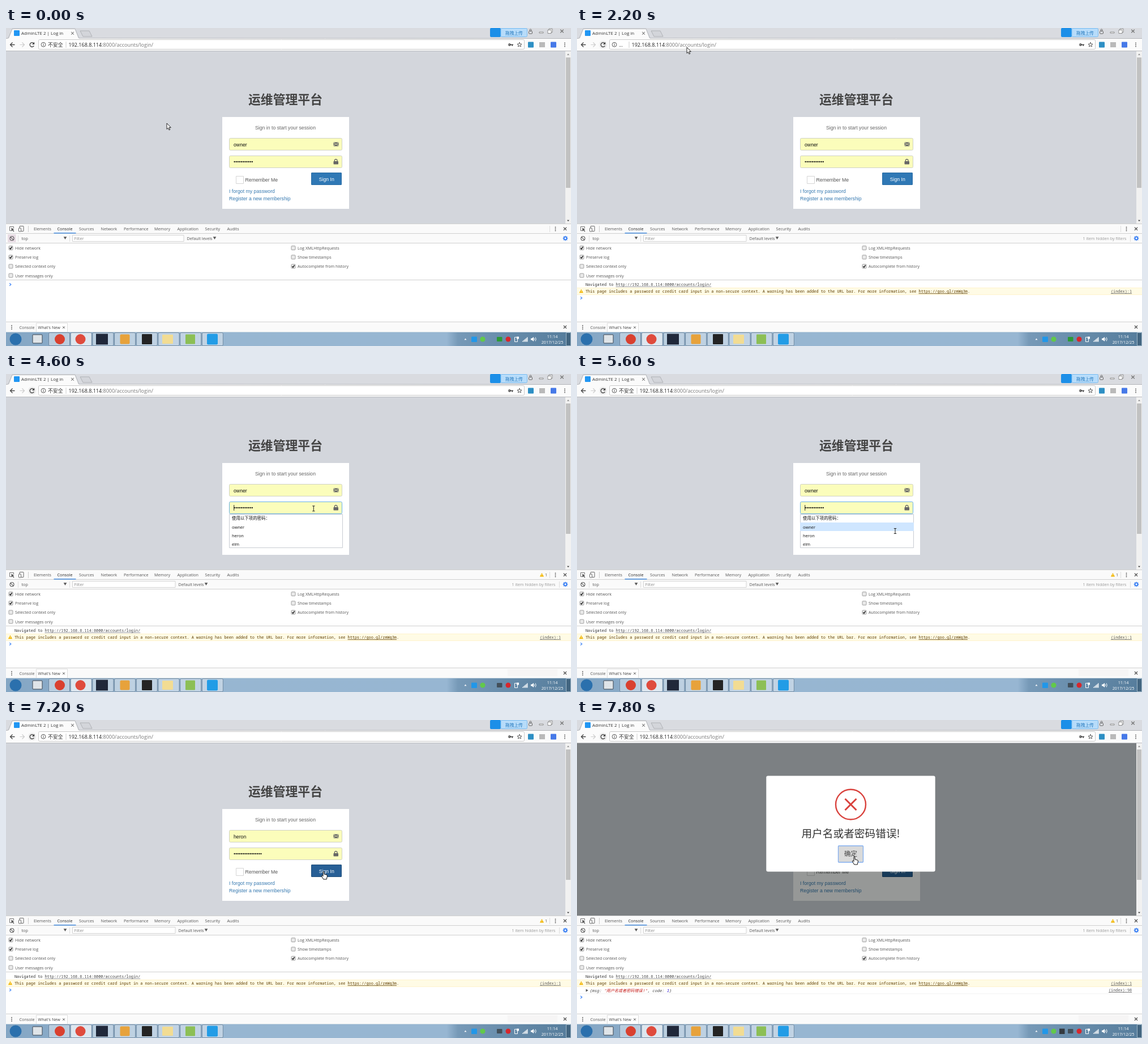
Write an HTML page with a canvas that moves like this. It is 998x561 px and loops after 8000 ms.

```html
<!DOCTYPE html>
<html lang="zh-CN">
<head>
<meta charset="utf-8">
<style>
html, body { margin: 0; width: 100%; height: 100%; overflow: hidden; background: #fff; }
canvas { display: block; }
</style>
</head>
<body>
<canvas id="stage" width="998" height="561"></canvas>
<script>
const c = document.getElementById('stage').getContext('2d');
const UI = '"Open Sans", "Noto Sans CJK SC", sans-serif';
const PAGE = '"Liberation Sans", Arial, sans-serif';
const CJK = '"Noto Sans CJK SC", "Noto Sans CJK", sans-serif';
const MONO = '"Noto Sans Mono", "Noto Sans CJK SC", monospace';
const LOOP = 8000, STEP = 200;
const URL_HOST = '192.168.8.114', URL_PATH = ':8000/accounts/login/';

function rect(x, y, w, h, fill, stroke, radius = 0, width = 1) {
  c.beginPath();
  c.roundRect(x, y, w, h, radius);
  if (fill) { c.fillStyle = fill; c.fill(); }
  if (stroke) { c.strokeStyle = stroke; c.lineWidth = width; c.stroke(); }
}
function dot(x, y, r, fill) {
  c.beginPath();
  c.arc(x, y, r, 0, 7);
  c.fillStyle = fill;
  c.fill();
}
function arc(x, y, r, color, width = 1, from = 0, to = 7) {
  c.beginPath();
  c.arc(x, y, r, from, to);
  c.strokeStyle = color;
  c.lineWidth = width;
  c.stroke();
}
function line(points, color, width = 1) {
  c.beginPath();
  points.forEach(([x, y]) => c.lineTo(x, y));
  c.strokeStyle = color;
  c.lineWidth = width;
  c.stroke();
}
function path(d, x, y, fill, stroke, width = 1) {
  c.save();
  c.translate(x, y);
  const p = new Path2D(d);
  if (fill) { c.fillStyle = fill; c.fill(p); }
  if (stroke) { c.strokeStyle = stroke; c.lineWidth = width; c.stroke(p); }
  c.restore();
}
// y is the middle of the capitals; returns the right end of the text
function text(s, x, y, size, color, family = UI, align = 'left', style = '') {
  c.font = `${style} ${size}px ${family}`;
  c.textAlign = align;
  c.fillStyle = color;
  c.fillText(s, x, y + size * 0.36);
  return x + c.measureText(s).width;
}
function link(s, x, y, color) {
  const end = text(s, x, y, 6.87, color, MONO);
  rect(x, y + 3.6, end - x, 0.7, color);
  return end;
}
const cross = (x, y, r, color, w = 1) => {
  line([[x - r, y - r], [x + r, y + r]], color, w);
  line([[x + r, y - r], [x - r, y + r]], color, w);
};
const menuDots = (x, y, color = '#555') => [-3, 0, 3].forEach(d => dot(x, y + d, 0.9, color));
const down = (x, y, color) => path('M-2.8-2.3H2.8L0 2.6Z', x, y, color);
const warning = (x, y) => {
  path('M0-3.5L3.6 3H-3.6Z', x, y, '#f2b600');
  rect(x - 0.4, y - 1.3, 0.8, 2.4, '#fff');
};

function drawBrowser(t) {
  rect(0, 0, 998, 18, '#d9dbe0');
  rect(0, 18, 998, 23, '#fbfbfb');
  rect(0, 40, 998, 1, '#b9bbbf');
  line([[0, 18.5], [4, 18], [11, 1.5], [122, 1.5], [129, 18], [998, 18.5]], '#b4b6ba');
  path('M5 19L11.5 2H121.5L128 19Z', 0, 0, '#fbfbfb');
  rect(14, 4, 10, 10, '#2196f3', null, 1);
  text('AdminLTE 2 | Log in', 27, 9.3, 7.95, '#333');
  cross(117.5, 9.3, 2.3, '#444');
  path('M131 5H147L152 15H136Z', 0, 0, '#d3d5da', '#a5a7ab', 0.8);
  rect(855, 0, 19, 16, '#1c8fe8', null, 2);
  rect(874, 0.5, 46.5, 15, '#b7dcfa', '#7dbdf0', 2);
  text('拖拽上传', 897.5, 9, 7.7, '#2378bd', CJK, 'center');
  arc(926.5, 3.7, 1.6, '#666');
  rect(923.5, 5.5, 6, 4.5, null, '#666', 1);
  rect(942, 7, 7, 2, '#fff', '#777', 0, 0.8);
  rect(959, 1.5, 6, 6, '#fff', '#777', 0, 0.8);
  rect(957, 3.5, 6, 6, '#fff', '#777', 0, 0.8);
  cross(982, 5.5, 2.8, '#777', 1.3);

  path('M4 0H-4M0-4L-4 0L0 4', 11.5, 29.5, null, '#444', 1.3);
  path('M-4 0H4M0-4L4 0L0 4', 28.5, 29.5, null, '#ccc', 1.2);
  if (t >= 1400) dot(46, 29.5, 7, '#ececec');
  arc(46, 29.5, 3.8, '#444', 1.3, 0.5, 5.6);
  path('M0 0V-4.2L-4.2 0Z', 50.2, 29, '#444');
  rect(57.5, 20.5, 858, 17, '#fff', '#c9c9c9', 2);
  arc(66, 29.3, 3.9, '#444', 0.9);
  rect(65.5, 28.5, 1, 3, '#444');
  rect(65.5, 26.7, 1, 1, '#444');

  const chip = t >= 1800 && t < 2200 ? '' : t === 2200 ? '...' : '不安全';
  const urlX = chip === '' ? 77 : chip === '...' ? 96.5 : 110.5;
  if (chip) {
    text(chip, 74, 29.3, 8.9, '#333', chip === '...' ? UI : CJK);
    line([[urlX - 4.5, 24], [urlX - 4.5, 35]], '#ccc');
  }
  const pathX = text(URL_HOST, urlX, 29.3, 9, '#222');
  text(URL_PATH, pathX, 29.3, 9, '#777');

  dot(889.3, 29.5, 2.3, '#444');
  dot(888.8, 29.5, 0.8, '#fff');
  rect(891, 28.7, 5, 1.5, '#444');
  rect(893.5, 29, 1.5, 2.7, '#444');
  path('M0-4L1.2-1.3 4-1 1.8.8 2.5 3.6 0 2.1-2.5 3.6-1.8.8-4-1-1.2-1.3Z', 907, 29.3, null, '#444', 0.9);
  rect(922, 24.5, 10, 10, '#2d8fc4', null, 1);
  rect(942, 25, 10, 9, '#b9b9b9');
  rect(962, 24.5, 10, 10, '#4679e8', null, 1);
  menuDots(987, 29.5);
}

function field(y, focused) {
  rect(394.5, y, 199, 21, '#fbfdbb', focused ? '#66afe9' : '#d0d2c4', 2);
}
function drawPage(t) {
  rect(0, 41, 988, 304, '#d3d6dc');
  text('运维管理平台', 493.5, 126, 21.85, '#444', CJK, 'center', 'bold');
  rect(382, 157, 224, 162, '#fff');
  text('Sign in to start your session', 493.5, 176, 8.72, '#666', PAGE, 'center');

  const second = t >= 5800, focused = t >= 4400 && t < 7000;
  field(194.5, false);
  text(second ? 'heron' : 'owner', 402, 205.4, 8.72, '#111', PAGE);
  rect(578.5, 201.5, 9, 7, '#666');
  path('M0 0L4.5 4L9 0M0 7L3.3 3M9 7L5.7 3', 578.5, 201.5, null, '#fbfdbb', 0.9);
  field(225.5, focused);
  for (let i = 0; i < (second ? 16 : 11); i++) dot(403.6 + i * 3.12, 236, 1.15, '#111');
  if (focused) rect(402.3, 231, 0.9, 10, '#111');
  rect(578.5, 235, 8.5, 5.5, '#666', null, 0.8);
  path('M-2.3 0V-2Q0-5 2.3-2V0', 582.7, 235, null, '#666', 1.3);

  rect(406.5, 261.5, 13, 13, '#fff', '#d5d5d5');
  text('Remember Me', 422.5, 268.3, 8.72, '#555', PAGE);
  const hover = t >= 6400;
  rect(539.5, 255.5, 53, 21, hover ? '#275f96' : '#2f78b5', hover ? '#22507d' : '#2b6da5', 0.5);
  text('Sign In', 566.3, 266.5, 8.72, '#fff', PAGE, 'center');
  text('I forgot my password', 394, 288.1, 8.72, '#3679b0', PAGE);
  text('Register a new membership', 394, 300.5, 8.72, '#3679b0', PAGE);

  if (t >= 4600 && t < 6200) {
    rect(394.5, 247.5, 200, 59, '#fff', '#c8ccd2');
    if (t >= 5200) rect(394, 262 + (second ? 15 : 0), 201, 15, '#cfe6ff');
    text('使用以下项的密码：', 399, 254.7, 7.45, '#111', CJK);
    ['owner', 'heron', 'elm'].forEach((name, i) => text(name, 399, 270 + i * 15, 7.5, '#111'));
  }
}

function drawScrollbar() {
  rect(988, 41, 10, 304, '#f1f1f1');
  rect(989, 52, 8, 230, '#c1c1c1');
  path('M-2 1.3L0-1.3L2 1.3Z', 993, 46.5, '#888');
  path('M-2-1.3L0 1.3L2-1.3Z', 993, 340, '#444');
}

function drawModal(t) {
  const p = Math.min(1, (t - 7400) / 400);
  c.save();
  c.beginPath();
  c.rect(0, 41, 988, 304);
  c.clip();
  rect(0, 41, 988, 304, `rgba(0,6,4,${0.295 + 0.115 * Math.min(1, p * 1.5)})`);
  const scale = 1 + 0.007 * (1 - p);
  c.translate(483.5, 183);
  c.scale(scale, scale);
  c.translate(-483.5, -183);
  rect(334.3, 98.5, 298.4, 169, '#fff', null, 3);
  c.globalAlpha = 0.25 + 0.75 * p;
  c.beginPath();
  c.ellipse(483.5, 149, 26.5, 26.5 * Math.cos((1 - p) * 1.4), 0, 0, 7);
  c.strokeStyle = '#d9423d';
  c.lineWidth = 0.6 + 1.8 * p;
  c.stroke();
  if (p > 0) {
    c.globalAlpha = p;
    cross(483.5, 149, 10 * p, '#d9423d', 3);
  }
  c.globalAlpha = 1;
  text('用户名或者密码错误!', 483.5, 199.8, 18.7, '#333', CJK, 'center');
  rect(461.5, 222, 44, 29, '#dadada', '#82aef0', 1, 1.3);
  text('确定', 483.5, 236.2, 11.5, '#444', CJK, 'center');
  c.restore();
}

function checkbox(x, y, label, on) {
  rect(x, y - 3.5, 7, 7, '#e9e9e9', '#a0a0a0', 1);
  if (on) line([[x + 1.4, y], [x + 2.9, y + 1.9], [x + 5.6, y - 2.1]], '#222', 1.5);
  text(label, x + 11, y + 0.4, 7.2, '#555');
}
function drawDevtools(t) {
  const logged = t >= 1800, failed = t >= 7400;
  rect(0, 345, 998, 191, '#fff');
  rect(0, 345, 998, 34, '#fafafa');
  [345, 362, 379, 444, 518].forEach(y => rect(0, y, 998, 1, '#d0d0d0'));

  path('M4 7H0V0H7V3', 6.5, 350.5, null, '#666', 0.9);
  path('M0 0V6L1.6 4.5L4 7L5 6L2.7 3.6L5 3Z', 9.5, 352.5, '#555');
  rect(24, 349.5, 7, 9, null, '#666', 0.5);
  rect(22.5, 353, 4, 6, '#fff', '#666', 0.5);
  line([[39.5, 349], [39.5, 360]], '#ccc');
  [['Elements', 49], ['Console', 90.5], ['Sources', 129], ['Network', 167.5], ['Performance', 208],
   ['Memory', 262], ['Application', 302.5], ['Security', 351.5], ['Audits', 390.5]]
    .forEach(([label, x]) => text(label, x, 354.7, 7.2, label === 'Console' ? '#222' : '#555'));
  rect(84.5, 361, 39, 1.4, '#4a90e2');
  if (t >= 2400) {
    warning(946.5, 354.5);
    text('1', 952, 354.7, 7.2, '#555');
  }
  line([[960.5, 349], [960.5, 360]], '#ddd');
  menuDots(970.5, 354.5);
  cross(987.5, 354.2, 2.6, '#444', 1.2);

  if (t < 400) rect(3, 364, 14.5, 14, '#e8dce4');
  arc(10.5, 371.3, 3.5, '#555', 1.1);
  line([[8, 368.8], [13, 373.8]], '#555', 1.1);
  line([[21.5, 366], [21.5, 377]], '#ddd');
  line([[112.5, 366], [112.5, 377]], '#ddd');
  text('top', 27.5, 371.5, 7.2, '#555');
  down(104.5, 370.5, '#555');
  const filterEnd = logged ? 299 : 314;
  rect(117.5, 365.5, filterEnd - 117.5, 11, '#fff', '#d2d2d2');
  text('Filter', 120.5, 371.8, 7.2, '#888');
  text('Default levels', filterEnd + 5.5, 371.3, 7.2, '#555');
  down(filterEnd + 54.5, 370.5, '#555');
  if (logged) {
    text('1 item hidden by filters', 970.5, 371.5, 7.2, '#999', UI, 'right');
    line([[977.5, 366], [977.5, 377]], '#ddd');
  }
  for (let i = 0; i < 4; i++) {
    const a = i * Math.PI / 4, x = Math.cos(a) * 4.3, y = Math.sin(a) * 4.3;
    line([[988 - x, 371 - y], [988 + x, 371 + y]], '#4285f4', 1.7);
  }
  dot(988, 371, 3.3, '#4285f4');
  dot(988, 371, 1.4, '#fff');

  ['Hide network', 'Preserve log', 'Selected context only', 'User messages only']
    .forEach((label, i) => checkbox(5, 388 + i * 16.2, label, i < 2));
  ['Log XMLHttpRequests', 'Show timestamps', 'Autocomplete from history']
    .forEach((label, i) => checkbox(504, 388 + i * 16.2, label, i === 2));

  if (logged) {
    const address = text('Navigated to ', 15, 452.8, 6.87, '#333', MONO);
    link('http://' + URL_HOST + URL_PATH, address, 452.8, '#444');
    rect(0, 458.5, 998, 12, '#fffbe5');
    rect(0, 458, 998, 0.8, '#fff0c0');
    rect(0, 470, 998, 0.8, '#fff0c0');
    warning(7.5, 464.3);
    const brown = '#5c3c00';
    const help = text('This page includes a password or credit card input in a non-secure context. A warning has been added to the URL bar. For more information, see ', 15, 464.5, 6.87, brown, MONO);
    const stop = link('https://goo.gl/zmWq3m', help, 464.5, brown);
    text('.', stop, 464.5, 6.87, brown, MONO);
    link('(index):1', 943, 464.5, '#555');
  }
  if (failed) {
    path('M-1.8-2.4L2.4 0L-1.8 2.4Z', 17.5, 477, '#555');
    let x = 22;
    [['{msg: ', '#444'], ['"用户名或者密码错误!"', '#c41a16'], [', code: ', '#444'], ['1', '#1c00cf'], ['}', '#444']]
      .forEach(([part, color]) => { x = text(part, x, 477, 7.1, color, MONO, 'left', 'italic'); });
    link('(index):98', 939, 476.7, '#555');
    rect(0, 482.5, 998, 0.7, '#eee');
  }
  const promptY = failed ? 489 : logged ? 476.3 : 452.5;
  path('M-1.3-2.2L1.3 0L-1.3 2.2', 7.5, promptY, null, '#3b82f6', 1.2);

  rect(0, 519, 998, 17, '#fafafa');
  if (t >= 2600) rect(886, 521, 88, 12, '#f6f5f5');
  menuDots(10, 528);
  text('Console', 23.5, 528.5, 7.2, '#555');
  rect(53.5, 520.5, 55, 16, '#fff', '#ddd');
  text("What's New", 56.5, 528.5, 7.2, '#444');
  cross(102, 528.3, 1.9, '#555');
  cross(987.5, 527.5, 2.6, '#444', 1.2);
}

function drawTaskbar(t) {
  const g = c.createLinearGradient(0, 0, 998, 0);
  [[0, '#84a6c4'], [0.3, '#97b6d1'], [0.78, '#97b6d2'], [0.8, '#7699b7'], [1, '#557c9b']]
    .forEach(([at, color]) => g.addColorStop(at, color));
  rect(0, 536, 998, 25, g);
  rect(0, 536, 998, 1, '#c3d3df');
  dot(17, 549, 10.5, '#2b70ad');
  rect(47, 541, 17, 15, '#dfe4e8', '#3b4550', 1);
  for (let i = 0; i < 8; i++) {
    const glass = `rgba(255,255,255,${i === 1 ? 0.7 : 0.4})`;
    rect(75.5 + i * 38.7, 537.5, 37, 23, glass, 'rgba(60,85,110,.5)', 2);
  }
  dot(95, 549, 9, '#d9402f');
  dot(131.5, 549, 9, '#df4b3d');
  rect(159, 539.5, 21, 19, '#20283a');
  rect(201.5, 540.5, 17, 17, '#e7a23b', null, 2);
  rect(240, 540, 18, 18, '#242424', null, 1);
  rect(276, 541, 19, 16, '#f2dc93', null, 1);
  rect(317, 540.5, 17, 17, '#8cbf55', null, 1);
  rect(355, 539.5, 19, 19, '#229ce6', null, 2);

  path('M-2 1.2L0-1.6L2 1.2Z', 811.5, 549, '#fff');
  rect(822, 544.5, 10, 9.5, '#2297e8', null, 1);
  dot(842, 549, 4.6, '#62c94a');
  if (t >= 7400) rect(852, 544.5, 9.5, 9.5, '#343a40');
  rect(867, 545, 9.5, 8, t >= 2600 ? '#43505a' : '#2c9b35', null, 1);
  dot(887, 549, 4.5, '#d8262c');
  rect(898.5, 545.5, 5, 8, null, '#fff');
  rect(902, 544.5, 4, 4, '#fff');
  for (let i = 0; i < 5; i++) rect(912 + i * 2, 552 - i * 1.6, 1.4, 1.5 + i * 1.6, '#fff');
  path('M0-1.5H2L5-4V4L2 1.5H0Z', 927, 549, '#fff');
  path('M0-2Q1.5 0 0 2M2-3.5Q4.5 0 2 3.5', 933, 549, null, '#fff', 0.9);
  text('11:14', 965, 544, 7.3, '#fff', UI, 'center');
  text('2017/12/25', 965, 554.7, 7.3, '#fff', UI, 'center');
  rect(989.5, 537.5, 8, 23, 'rgba(30,55,75,.35)', '#9fb7c8');
}

// [time, x, y]
const MOVES = [
  [0, 284, 168], [200, 284, 168], [1200, 62, 43], [1400, 46, 30], [1800, 46, 30], [2200, 194, 34],
  [2400, 190, 27], [2600, 205, 40], [3600, 455, 196], [3800, 461, 209], [4400, 540, 236], [5000, 550, 240],
  [5600, 562, 277], [5800, 562, 285], [6200, 562, 285], [6600, 561, 267], [7400, 561, 267], [7800, 490, 241],
];
function mouseAt(t) {
  const i = MOVES.findIndex(m => m[0] >= t);
  if (i <= 0) return MOVES[0].slice(1);
  const [t0, x0, y0] = MOVES[i - 1], [t1, x1, y1] = MOVES[i];
  const k = (t - t0) / (t1 - t0);
  return [x0 + (x1 - x0) * k, y0 + (y1 - y0) * k];
}
function drawMouse(t) {
  const [x, y] = mouseAt(t);
  if (t < 4000) path('M0 0V10.5L2.4 8.3L4 12L5.7 11.3L4.1 7.6H7.3Z', x, y, '#fff', '#111', 0.9);
  else if (t < 6400) path('M-2.2-4.5H2.2M0-4.5V4.5M-2.2 4.5H2.2', x, y, null, '#222', 1);
  else path('M-1 1Q0-.5 1 1V5L5 6Q6.6 6.5 6.5 8L5.3 14H-.3L-3.3 9Q-4 7-2.4 7L-1 8.5Z', x, y, '#fff', '#111', 1);
}

function frame(now) {
  const t = Math.floor((now % LOOP) / STEP) * STEP;
  drawBrowser(t);
  drawPage(t);
  if (t >= 7400) drawModal(t);
  drawScrollbar();
  drawDevtools(t);
  drawTaskbar(t);
  drawMouse(t);
  requestAnimationFrame(frame);
}
requestAnimationFrame(frame);
</script>
</body>
</html>
```
